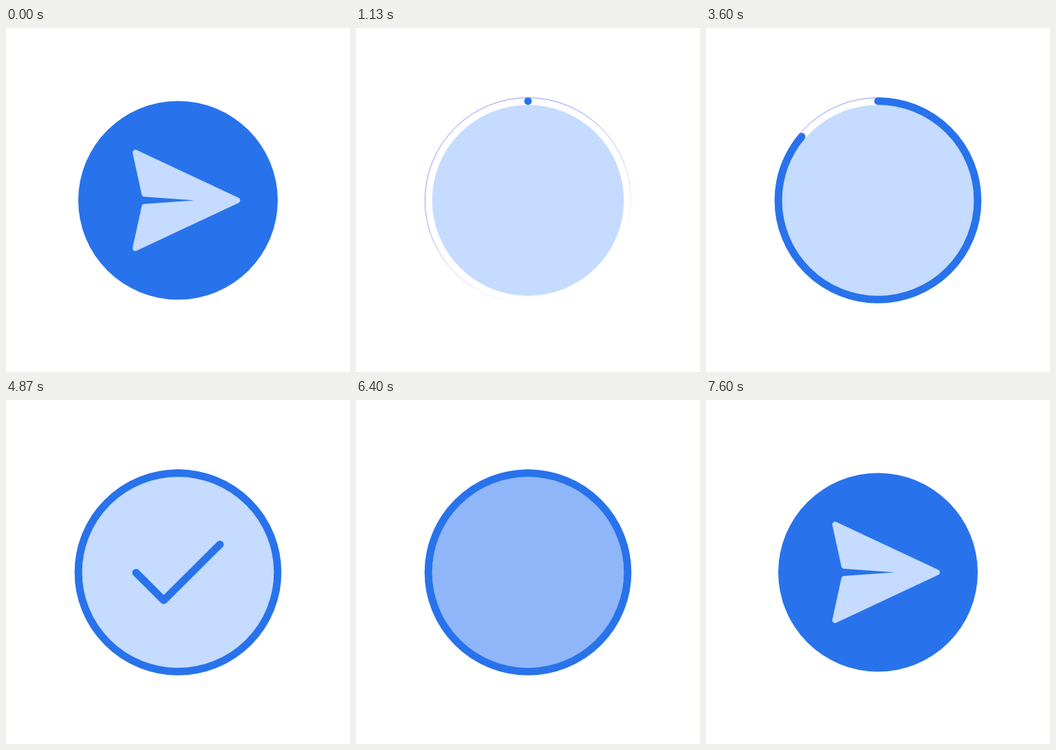
Recreate the animation shown at these times as an HTML page. Size 500x502 px, loop 7.67 s.

```html
<!DOCTYPE html>
<html lang="en">
<head>
<meta charset="utf-8">
<title>Send and confirm</title>
<style>
  html, body { margin: 0; height: 100%; overflow: hidden; background: #fff; }
  svg { display: block; width: 500px; height: 502px; }
  .line { fill: none; stroke: #2873ec; stroke-width: 11; stroke-linecap: round; stroke-linejoin: round; }
</style>
</head>
<body>
<svg viewBox="0 0 500 502">
  <defs>
    <clipPath id="disk"><circle cx="250" cy="251.5" r="145"/></clipPath>
    <linearGradient id="rim" x1="0.2" y1="0" x2="0.8" y2="1">
      <stop offset="0.3" stop-color="#6f7cff"/>
      <stop offset="0.85" stop-color="#6f9cff" stop-opacity="0"/>
    </linearGradient>
  </defs>

  <circle cx="250" cy="251.5" r="145" fill="#2873ec"/>
  <g clip-path="url(#disk)">
    <path id="plane" fill="#c5dbff" d="M184.1 182.6A4 4 0 0 1 189.8 178.1L338 247.7A4.2 4.2 0 0 1 338 255.3
      L189.8 324.9A4 4 0 0 1 184.1 320.4L197.2 260.2A4.5 4.5 0 0 1 201.3 256.7L274.5 251.5
      L201.3 246.3A4.5 4.5 0 0 1 197.2 242.8Z"/>
  </g>

  <circle class="cover" cx="250" cy="251.5" r="145" fill="#c5dbff"/>
  <g class="cover" fill="none">
    <circle cx="250" cy="251.5" r="144.8" stroke="#fff" stroke-width="11"/>
    <circle cx="250" cy="251.5" r="149.8" stroke="url(#rim)" stroke-width="0.8"/>
  </g>

  <circle id="ring" class="line" cx="250" cy="251.5" r="144.8" pathLength="360" transform="rotate(-90 250 251.5)"/>
  <path id="check" class="line" pathLength="100" d="M189 252L229.3 292.3L311 210.7"/>
</svg>
<script>
const LOOP = 7670, STEP = LOOP / 115;
const byId = id => document.getElementById(id);
const plane = byId('plane'), ring = byId('ring'), check = byId('check');
const covers = document.querySelectorAll('.cover');

const span = (t, from, to) => Math.min(1, Math.max(0, (t - from) / (to - from)));
const ease = p => p * p * (3 - 2 * p);
const eased = (t, from, to) => ease(span(t, from, to));

function trim(el, length) {
  el.style.visibility = length > 0 ? 'visible' : 'hidden';
  el.setAttribute('stroke-dasharray', `${length} 1000`);
}

function planeOffset(t) {
  if (t < 3000) return 230 * span(t, 333, 600) ** 2;
  return -313 * 2 ** (-10 * span(t, 6533, LOOP));
}

function draw(t) {
  plane.setAttribute('transform', `translate(${planeOffset(t)} 0)`);

  const cover = span(t, 733, 933) - span(t, 6333, 6533);
  for (const el of covers) el.setAttribute('opacity', cover);

  // Progress runs to a quarter, rests, then finishes in two pushes.
  trim(ring, 90 * eased(t, 1133, 2067) + 220 * eased(t, 2200, 3600) + 50 * eased(t, 3600, 4330));
  ring.setAttribute('opacity', 1 - span(t, 6533, 6733));

  trim(check, 100 * (eased(t, 4533, 4867) - eased(t, 5667, 5930)));
}

// The motion is stepped at 15 pictures per second.
function tick() {
  const t = performance.now() % LOOP;
  draw(Math.floor((t + 4) / STEP) * STEP % LOOP);
  requestAnimationFrame(tick);
}
tick();
</script>
</body>
</html>
```
